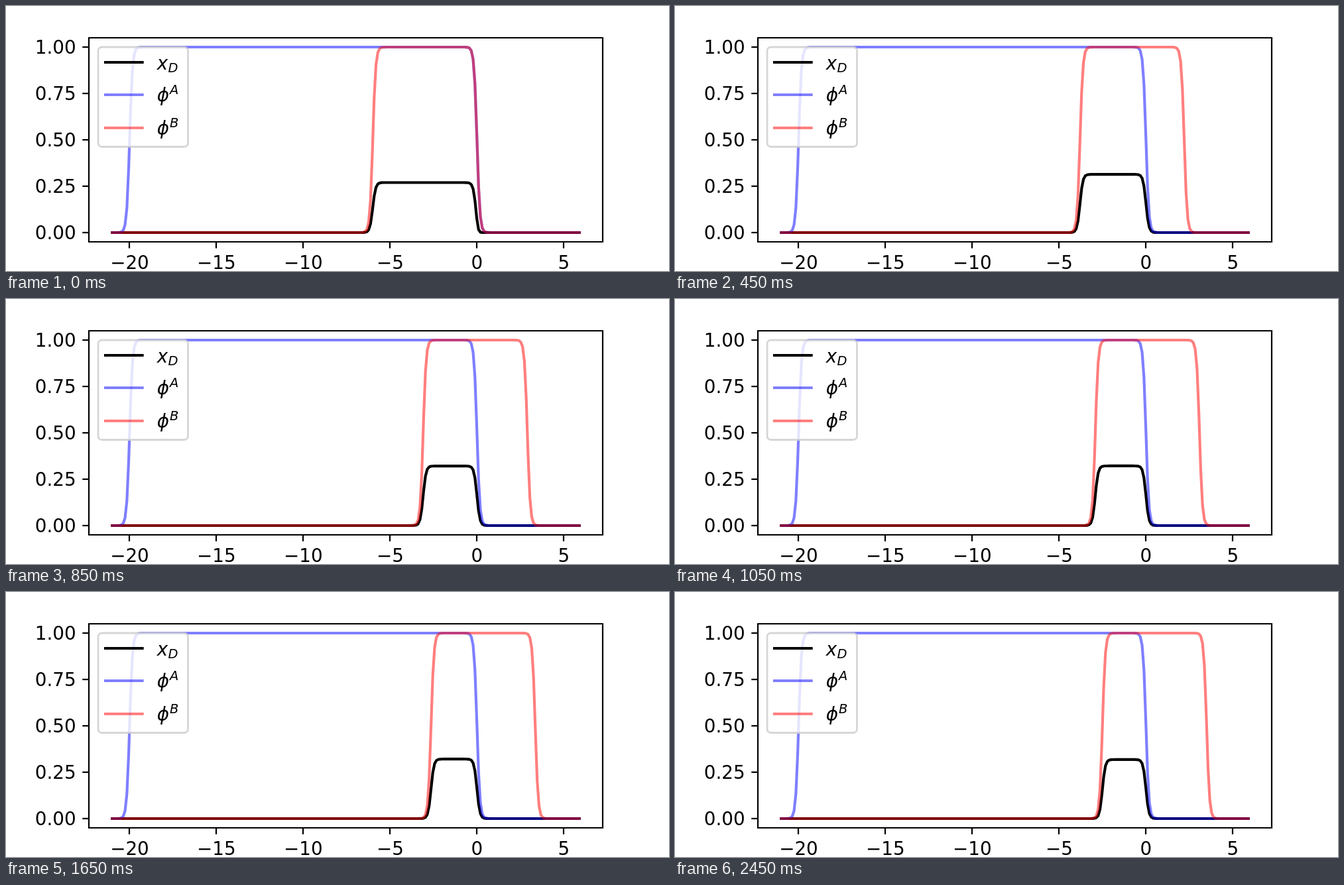
Animation, 1000 px wide and 400 px high, one loop 2.5 s. Source, as an HTML page with a canvas:

```html
<!DOCTYPE html>
<html lang="en">
<head>
<meta charset="utf-8">
<title>Overlap profile</title>
<style>
  html, body { margin: 0; width: 100%; height: 100%; overflow: hidden; background: #fff; }
  canvas { display: block; }
</style>
</head>
<body>
<canvas id="plot" width="1000" height="400"></canvas>
<script>
const ctx = document.getElementById('plot').getContext('2d');
const STEP = 50, STEPS = 50;
const BOX = { l: 125, t: 48, r: 900, b: 356 };
const CELLS = 256, X0 = -21, DX = 27 / CELLS;
const SCALE = 775 / 1.1 / (DX * (CELLS - 1));
const LEFT = BOX.l + 775 / 22;
const EM = 10 * 200 / 72;
const LINE = EM * 0.15;
const BLACK = '#000', BLUE = 'rgba(0,0,255,0.5)', RED = 'rgba(255,0,0,0.5)';

const px = x => LEFT + (x - X0) * SCALE;
const py = y => 342 - 280 * y;
const edge = x => (1 + Math.tanh(6 * x)) / 2;
const plateau = (x, a, b) => edge(x - a) * edge(b - x);

// Fast relaxation followed by slow drift
const shiftAt = n => 3.6 - 2.6 * Math.exp(-0.14 * n) - Math.exp(-0.046 * n);
const heightAt = n => 0.3265 - 0.00017 * n - 0.0568 * Math.exp(-0.18 * n);

function stroke(color, width) {
  ctx.strokeStyle = color;
  ctx.lineWidth = width;
  ctx.stroke();
}

function curve(f, color) {
  ctx.beginPath();
  for (let i = 0; i < CELLS; i++) {
    const x = X0 + i * DX;
    ctx.lineTo(px(x), py(f(x)));
  }
  stroke(color, LINE);
}

function segment(x1, y1, x2, y2, color, width) {
  ctx.beginPath();
  ctx.moveTo(x1, y1);
  ctx.lineTo(x2, y2);
  stroke(color, width);
}

function label(str, x, y, align, size = EM, style = '') {
  ctx.font = `${style} ${size}px "DejaVu Sans", sans-serif`;
  ctx.textAlign = align;
  ctx.fillStyle = BLACK;
  ctx.fillText(str, x, y);
}

function axes() {
  const w = EM * 0.08, len = EM * 0.35;
  ctx.lineCap = 'butt';
  for (let v = -20; v <= 5; v += 5) {
    const x = Math.round(px(v));
    segment(x, BOX.b, x, BOX.b + len, BLACK, w);
    label(String(v).replace('-', '\u2212'), px(v), 397, 'center');
  }
  for (let v = 0; v <= 1; v += 0.25) {
    segment(BOX.l - len, py(v), BOX.l, py(v), BLACK, w);
    label(v.toFixed(2), BOX.l - 2 * len, py(v) + 10.3, 'right');
  }
  ctx.lineJoin = 'miter';
  ctx.beginPath();
  ctx.rect(BOX.l, BOX.t, BOX.r - BOX.l, BOX.b - BOX.t);
  stroke(BLACK, w);
}

function legendRow(y, color, base, script, baseY, scriptX, scriptY) {
  ctx.lineCap = 'square';
  segment(150, y, 205.6, y, color, LINE);
  label(base, 227.8, baseY, 'left', EM, 'italic');
  label(script, scriptX, scriptY, 'left', EM * 0.7, 'italic');
}

function legend() {
  ctx.beginPath();
  ctx.roundRect(139, 62, 135.5, 150.5, EM * 0.2);
  ctx.fillStyle = 'rgba(255,255,255,0.8)';
  ctx.fill();
  stroke('rgba(204,204,204,0.8)', EM * 0.1);
  legendRow(85, BLACK, 'x', 'D', 95.5, 244.5, 100);
  legendRow(134, BLUE, '\u03d5', 'A', 143.5, 247, 132.5);
  legendRow(184, RED, '\u03d5', 'B', 193.5, 247, 182.5);
}

function draw(n) {
  const s = shiftAt(n), h = heightAt(n);
  const phiA = x => plateau(x, -20, 0);
  const phiB = x => plateau(x, s - 6, s);
  ctx.fillStyle = '#fff';
  ctx.fillRect(0, 0, 1000, 400);
  ctx.lineCap = 'square';
  ctx.lineJoin = 'round';
  curve(x => h * phiA(x) * phiB(x), BLACK);
  curve(phiA, BLUE);
  curve(phiB, RED);
  axes();
  legend();
}

const start = performance.now();
function tick() {
  draw(Math.floor((performance.now() - start) / STEP) % STEPS);
  requestAnimationFrame(tick);
}
tick();
</script>
</body>
</html>
```
